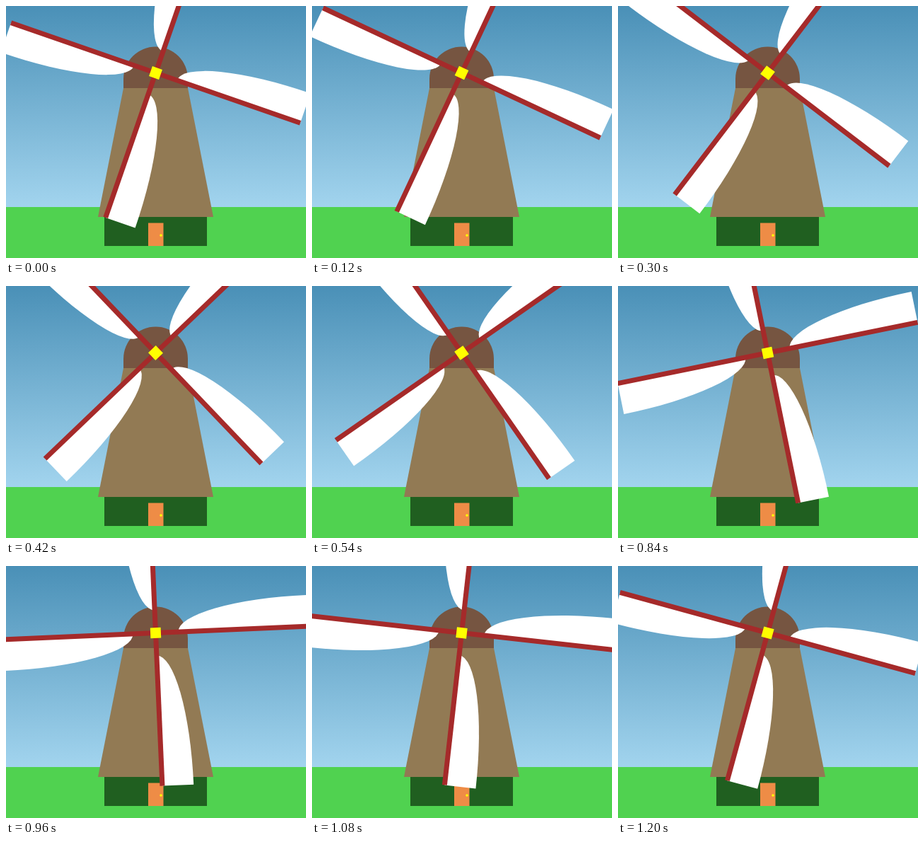
Animation of 424 by 356 pixels, one loop 1.26 s. Source, as an HTML page with a canvas:

```html
<!DOCTYPE html>
<html lang="en">
<head>
<meta charset="utf-8">
<title>Windmill</title>
<style>
  html, body { margin: 0; width: 100%; height: 100%; overflow: hidden; }
  canvas { display: block; }
</style>
</head>
<body>
<canvas id="stage" width="424" height="356"></canvas>
<script>
const ctx = document.getElementById('stage').getContext('2d');
const WIDTH = 424, HEIGHT = 356, HORIZON = 284;
const LOOP = 1260, STEP = 60;
const HUB = { x: 211.5, y: 94.5 };
const ARM = 216.3, ARM_WIDTH = 7, SAIL_START = 32, SAIL_WIDTH = 44.3;

// [time in ms, rotation in degrees]; a quarter turn closes the loop
const TURN = [[0, 19.1], [120, 25.1], [300, 37.4], [540, 55.2],
              [720, 69.5], [960, 87.5], [1200, 105.3], [LOOP, 109.1]];

const sky = ctx.createLinearGradient(0, 0, 0, HORIZON);
sky.addColorStop(0, '#4a90b7');
sky.addColorStop(1, '#a2d4ee');

function rotationAt(time) {
  const next = TURN.findIndex(([t]) => t > time);
  const [t0, a0] = TURN[next - 1], [t1, a1] = TURN[next];
  return (a0 + (a1 - a0) * (time - t0) / (t1 - t0)) * Math.PI / 180;
}

function rect(color, x, y, w, h) {
  ctx.fillStyle = color;
  ctx.fillRect(x, y, w, h);
}

function drawScene() {
  rect(sky, 0, 0, WIDTH, HORIZON);
  rect('#50d250', 0, HORIZON, WIDTH, HEIGHT - HORIZON);
  rect('#205f20', 139, 298, 145, 41);
  rect('#ee8c46', 201, 306.5, 21.5, 32.5);

  ctx.fillStyle = '#ffff00';
  ctx.beginPath();
  ctx.arc(219, 324, 1.8, 0, 2 * Math.PI);
  ctx.fill();

  ctx.fillStyle = '#927a54';
  ctx.beginPath();
  ctx.moveTo(166, 116);
  ctx.lineTo(257, 116);
  ctx.lineTo(293, 298);
  ctx.lineTo(130, 298);
  ctx.fill();

  ctx.fillStyle = '#765541';
  ctx.beginPath();
  ctx.moveTo(166, 116);
  ctx.arc(211.5, 103, 45.5, Math.PI, 0);
  ctx.lineTo(257, 116);
  ctx.fill();
}

function drawBlade() {
  ctx.fillStyle = '#ffffff';
  ctx.beginPath();
  ctx.moveTo(ARM, 0);
  ctx.ellipse(ARM, 0, ARM - SAIL_START, SAIL_WIDTH, 0, Math.PI, 1.5 * Math.PI);
  ctx.fill();
  rect('#a52a2a', 0, -ARM_WIDTH / 2, ARM, ARM_WIDTH);
}

function drawRotor(angle) {
  ctx.save();
  ctx.translate(HUB.x, HUB.y);
  ctx.rotate(angle);
  for (let i = 0; i < 4; i++) {
    drawBlade();
    ctx.rotate(Math.PI / 2);
  }
  rect('#ffff00', -7.4, -7.4, 14.8, 14.8);
  ctx.restore();
}

let start;
function frame(now) {
  start ??= now;
  const time = Math.max(0, now - start) % LOOP;
  drawScene();
  drawRotor(rotationAt(Math.floor(time / STEP) * STEP));
  requestAnimationFrame(frame);
}
requestAnimationFrame(frame);
</script>
</body>
</html>
```
